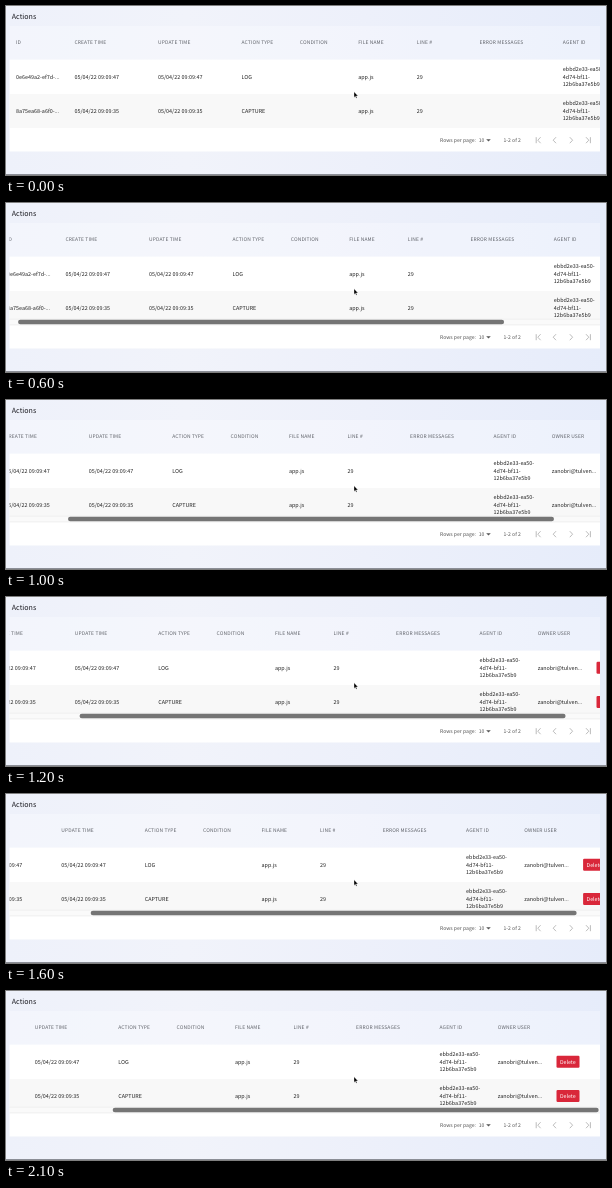
An HTML page for the animation above (2400 ms loop, 600 by 169 pixels).

```html
<!DOCTYPE html>
<html lang="en">
<head>
<meta charset="utf-8">
<title>Actions table</title>
<style>
  html, body { margin: 0; width: 100%; height: 100%; overflow: hidden; }
  svg { display: block; width: 100vw; height: 100vh; }
  text {
    font-family: "Noto Sans CJK JP", "Noto Sans CJK SC", "Noto Sans", sans-serif;
    font-size: 5.42px; fill: #222; text-rendering: geometricPrecision;
  }
  .title { font-size: 7.1px; fill: #1c1c22; }
  .head { font-size: 4.95px; letter-spacing: .14px; fill: #5f6269; }
  .foot { font-size: 5.1px; fill: #555; }
  .button { font-size: 5.3px; fill: #fff; }
  .icon { fill: none; stroke: #b4b4b4; stroke-width: .9; }
</style>
</head>
<body>
<svg id="stage" viewBox="0 0 600 169" preserveAspectRatio="none">
  <defs>
    <linearGradient id="sky" x1="0" y1="0" x2="1" y2="0">
      <stop offset="0" stop-color="#eef1fa"/>
      <stop offset=".3" stop-color="#f1f3fa"/>
      <stop offset=".6" stop-color="#edf0fa"/>
      <stop offset="1" stop-color="#e6ecfa"/>
    </linearGradient>
    <clipPath id="view"><rect x="3.5" y="20" width="590.5" height="102"/></clipPath>
  </defs>
  <rect width="600" height="169" fill="url(#sky)"/>
  <rect y="168" width="600" height="1" fill="#8b8e96"/>
  <rect x="3.5" y="20" width="590.5" height="33.5" fill="#fff" opacity=".25"/>
  <rect x="3.5" y="53.5" width="590.5" height="92" fill="#fff"/>
  <rect x="3.5" y="88" width="590.5" height="34" fill="#f8f8f8"/>
  <g clip-path="url(#view)"><g id="table"></g></g>
  <g id="bar">
    <rect x="3.5" y="116" width="590.5" height="6" fill="#fafafa"/>
    <path d="M3.5 116.2H594M3.5 121.9H594" stroke="#e3e3e3" stroke-width=".5"/>
    <rect id="thumb" y="116.7" width="486" height="4.5" rx="2.25" fill="#757575"/>
  </g>
  <g id="fixed"></g>
  <path d="M480.2 133.2h4.6l-2.3 2.4z" fill="#555"/>
  <path class="icon" d="M530.2 131.2v6M534.6 131.2l-2.8 3 2.8 3M550 131.2l-2.8 3 2.8 3M563.8 131.2l2.8 3-2.8 3M580 131.2l2.8 3-2.8 3M584.4 131.2v6"/>
  <path d="M348 85.8v5.6l1.3-1.2.9 2 .9-.4-.9-1.9h1.8z" fill="#000" stroke="#fff" stroke-width=".35"/>
</svg>
<script>
const $ = id => document.getElementById(id);
const LOOP = 2400, STEP = 100;

function add(parent, tag, attrs, text = "") {
  const el = document.createElementNS("http://www.w3.org/2000/svg", tag);
  for (const key in attrs) el.setAttribute(key, attrs[key]);
  el.textContent = text;
  parent.append(el);
}

const label = (parent, x, y, text, cls = "") =>
  add(parent, "text", { x, y, class: cls }, text);

const columns = [
  [10, "ID"], [68.5, "CREATE TIME"], [152, "UPDATE TIME"], [235.5, "ACTION TYPE"],
  [293.8, "CONDITION"], [352.2, "FILE NAME"], [410.8, "LINE #"],
  [473.4, "ERROR MESSAGES"], [556.8, "AGENT ID"], [615, "OWNER USER"]
];
const agent = ["ebbd2e33-ea50-", "4d74-bf11-", "12b6ba37e5b9"];

function addRow(mid, id, time, type) {
  const table = $("table"), y = mid + 2;
  const cells = [id, time, time, type, "", "app.js", "29", "", "", "zanobri@tulven..."];
  cells.forEach((text, i) => text && label(table, columns[i][0], y, text));
  agent.forEach((text, i) => label(table, columns[8][0], y + (i - 1) * 7.5, text));
  add(table, "rect", { x: 673.8, y: mid - 6, width: 23, height: 12, rx: 1.2, fill: "#d9273a" });
  label(table, 677.2, y - .1, "Delete", "button");
}

columns.forEach(([x, text]) => label($("table"), x, 38.1, text, "head"));
addRow(70.7, "0e6e49a2-ef7d-...", "05/04/22 09:09:47", "LOG");
addRow(104.9, "8a75ea68-a6f0-...", "05/04/22 09:09:35", "CAPTURE");

label($("fixed"), 5.8, 13.2, "Actions", "title");
label($("fixed"), 434, 136, "Rows per page:", "foot");
label($("fixed"), 472.8, 136, "10", "foot");
label($("fixed"), 497.5, 136, "1-2 of 2", "foot");

// Two trackpad swipes, one scroll position per step
const swipe = [.5, 3, 9, 20, 33.3, 53, 69.3, 79, 83.3, 83.3, 85.5, 90, 96.7, 107, 117, 123.3];
const START = 400;

function draw(t) {
  const n = Math.floor((t - START) / STEP);
  const x = n < 0 ? 0 : swipe[Math.min(n, swipe.length - 1)];
  $("table").setAttribute("transform", `translate(${-x} 0)`);
  $("bar").setAttribute("visibility", n < 0 ? "hidden" : "visible");
  $("thumb").setAttribute("x", 4.6 + x * .828);
}

const begin = performance.now();
function tick() {
  draw((performance.now() - begin) % LOOP);
  requestAnimationFrame(tick);
}
tick();
</script>
</body>
</html>
```
